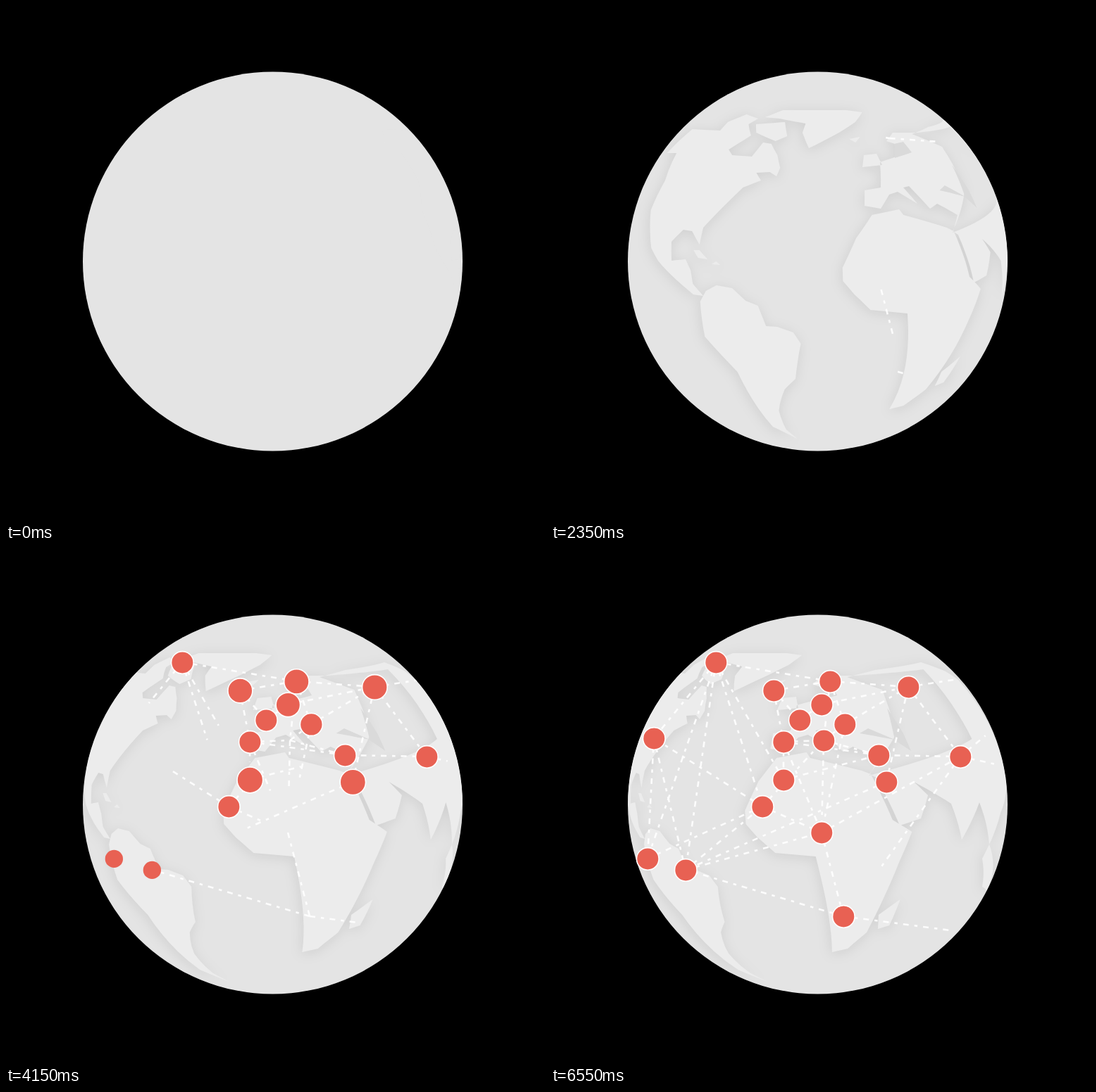
Write an HTML page that moves like this. It is 765 px wide and 732 px high and loops after 6600 ms.

```html
<!DOCTYPE html>
<html lang="en">
<head>
<meta charset="utf-8">
<title>Globe network</title>
<style>
  html, body { margin: 0; width: 100%; height: 100%; overflow: hidden; background: #000; }
  svg { display: block; width: 100vw; height: 100vh; }
</style>
</head>
<body>
<svg viewBox="0 0 765 732">
  <defs>
    <clipPath id="disc"><circle cx="378.5" cy="363" r="269.5"/></clipPath>
    <filter id="soft" filterUnits="userSpaceOnUse" x="90" y="80" width="580" height="570" color-interpolation-filters="sRGB">
      <feDropShadow dx="-1" dy="3" stdDeviation="9" flood-color="#000" flood-opacity=".085"/>
    </filter>
  </defs>
  <circle cx="378.5" cy="363" r="269.5" fill="#e4e4e4"/>
  <g clip-path="url(#disc)">
    <g id="world">
      <path id="land" fill="#ececec" filter="url(#soft)"/>
      <path id="seas" fill="#dadada"/>
    </g>
    <g id="routes" stroke="#fff" stroke-opacity=".9" stroke-width="2.6" stroke-dasharray="8 8 4.5 8"/>
  </g>
  <g id="pins" fill="#e86153" stroke="#fff"/>
</svg>
<script>
const LOOP = 6600, STEP = 50, CX = 378.5, CY = 363, R = 269.5;
const byId = id => document.getElementById(id);
const clamp = (v, lo = 0, hi = 1) => Math.min(hi, Math.max(lo, v));
const ringRadius = y => Math.sqrt(Math.max(1, R * R - (y - CY) ** 2));

// Decelerating spin in radians; zero at the end of the loop.
function spin(s) {
  const push = 45 * Math.max(0, 1 - s / 1.5) ** 2;
  return (0.0594 * ((8 - s) ** 3.6 - 3.81) + push) * Math.PI / 180;
}
// Pins and routes slide sideways as one flat layer.
const slide = s => 0.0495 * ((8 - s) ** 4.3 - 4.94);

// An outline as seen at a given second, converted to longitude and height.
function outline(second, text) {
  const turn = spin(second);
  const points = text.trim().split(/\s+/).map(pair => {
    const [x, y] = pair.split(',').map(Number);
    return [Math.asin(clamp((x - CX) / ringRadius(y), -1, 1)) - turn, y];
  });
  return points.flatMap(([lon, y], i) => {
    const [lon2, y2] = points[(i + 1) % points.length];
    const cuts = Math.ceil(Math.hypot((lon2 - lon) * R, y2 - y) / 14) || 1;
    return Array.from({ length: cuts }, (_, k) =>
      [lon + (lon2 - lon) * k / cuts, y + (y2 - y) * k / cuts]);
  });
}

const northAmerica = outline(1.5, `197,209 237,175 295,177 303,165 330,154 352,160 340,168
  350,184 320,204 328,212 360,214 372,194 385,196 398,212 406,230 403,242 392,236 372,237
  381,248 355,258 297,315 292,339 278,320 262,318 241,335 242,362 268,360 277,376 280,395
  297,412 280,410 215,362 200,344 192,290 213,248 222,209`);
const baffin = outline(1.5, '352,168 395,165 405,185 390,192 357,180');
const greenland = outline(1.5, `362,158 385,148 470,148 490,151 488,165 440,202 425,180
  425,167 385,160`);
const iceland = outline(1.5, '489,189 501,186 498,194');
const cuba = outline(1.5, '282,347 292,347 306,360 290,358');
const hispaniola = outline(1.5, '313,367 320,363 327,368');
const southAmerica = outline(1.5, `291,420 302,405 320,397 345,401 365,419 383,426 392,455
  408,456 430,464 438,480 420,530 400,545 380,575 376,602 382,615 358,598 335,520 292,470`);
const africa = outline(3.45, `338,391 337,372 357,330 382,297 424,289 430,297 500,315 512,320
  540,385 563,402 545,445 490,545 460,568 438,573 437,437 380,432 355,410`);
const madagascar = outline(3.45, '505,540 510,520 540,498 520,535');
const britain = outline(2.35, '444,212 462,210 470,226 442,229');
const europe = outline(2.35, `445,262 445,284 468,288 480,268 492,264 520,281 500,258 508,256
  538,288 548,281 577,297 570,322 640,270 566,171 520,180 485,180 476,192 488,196 490,214
  467,222 468,258`);
const asia = outline(6.55, `452,320 490,262 470,200 420,182 460,172 525,161 560,174 578,186
  646,325 638,375 622,420 608,360 583,413 568,362 515,331 535,350 525,383 495,393 462,325`);
const sumatra = outline(6.55, '612,440 622,420 622,488 612,480');
const lands = [northAmerica, baffin, greenland, iceland, cuba, hispaniola, southAmerica,
  africa, madagascar, britain, europe, asia, sumatra];

const baltic = outline(2.35, '487,196 500,193 512,208 488,216');
const blackSea = outline(6.55, '438,262 450,255 488,271');
const caspian = outline(6.55, '477,226 500,262 511,287 488,272');
const seas = [baltic, blackSea, caspian];

function project(shapes, turn) {
  return shapes.map(shape => 'M' + shape.map(([lon, y]) => {
    const angle = clamp(lon + turn, -Math.PI / 2, Math.PI / 2);
    return (CX + ringRadius(y) * Math.sin(angle)).toFixed(1) + ' ' + y.toFixed(1);
  }).join('L') + 'Z').join('');
}

// Resting place and the second the pin pops up; places without a second have no pin.
const places = {
  baffin: [234, 161, 2.8], iceland: [316, 201, 3.5], norway: [396, 188, 3.55],
  holland: [384, 221, 3.42], france: [353, 243, 2.6], balkans: [417, 249, 3.05],
  spain: [330, 274, 2.6], italy: [387, 272, 4.45], turkey: [465, 293, 2.4],
  egypt: [476, 331, 3.7], urals: [507, 196, 3.6], india: [581, 295, 2.8],
  morocco: [330, 328, 3.75], dakar: [300, 366, 2.8], congo: [384, 403, 4.82],
  carolina: [146, 269, 4.2], panama: [137, 440, 3.95], guyana: [191, 456, 3.95],
  cape: [415, 522, 4.65],
  siberia: [577, 185], china: [636, 307], tibet: [618, 264], kenya: [462, 461], ocean: [574, 543]
};

// Routes grouped by first second and seconds to draw.
const waves = [
  [2, 0.6, 'norway-urals congo-cape'],
  [2.3, 1.5, 'cape-guyana norway-baffin'],
  [2.5, 1.1, `urals-india india-turkey spain-turkey egypt-urals balkans-urals iceland-spain
    iceland-france urals-siberia norway-italy norway-balkans france-holland`],
  [3.2, 0.9, 'spain-italy iceland-norway holland-urals italy-turkey italy-balkans'],
  [3.45, 1.3, `baffin-morocco baffin-dakar baffin-carolina dakar-carolina dakar-congo
    egypt-guyana spain-morocco spain-congo italy-congo balkans-congo morocco-turkey
    dakar-italy india-china`],
  [4.9, 0.9, `congo-india carolina-panama baffin-panama carolina-guyana baffin-guyana`],
  [5.3, 1.3, 'panama-dakar guyana-dakar guyana-congo india-tibet india-kenya'],
  [2.4, 4.2, 'cape-ocean']
];

function make(tag, parent) {
  return byId(parent).appendChild(document.createElementNS('http://www.w3.org/2000/svg', tag));
}
function set(node, attrs) {
  for (const name in attrs) node.setAttribute(name, attrs[name]);
}
const routes = waves.flatMap(([start, span, names]) => names.split(/\s+/).map(name => {
  const [from, to] = name.split('-').map(key => places[key]);
  return { from, to, start, span, node: make('line', 'routes') };
}));
const pins = Object.values(places).filter(place => place.length === 3)
  .map(([x, y, start]) => ({ x, y, start, node: make('circle', 'pins') }));

// Grows from a dot, overshoots, then settles.
function popRadius(age) {
  if (age < 0.35) return 1 + 17.5 * Math.min(1, age / 0.3);
  return 15.8 + 2.7 * clamp((1.15 - age) / 0.8);
}

function draw(s) {
  const turn = spin(s), shift = slide(s);
  byId('world').setAttribute('opacity', clamp(0.05 + s / 0.4));
  byId('land').setAttribute('d', project(lands, turn));
  byId('seas').setAttribute('d', project(seas, turn));
  for (const { from: [x, y], to, start, span, node } of routes) {
    const p = clamp((s - start) / span);
    set(node, {
      x1: x + shift, y1: y,
      x2: x + (to[0] - x) * p + shift, y2: y + (to[1] - y) * p,
      visibility: p > 0 ? 'visible' : 'hidden'
    });
  }
  for (const { x, y, start, node } of pins) {
    const age = s - start;
    set(node, {
      cx: x + shift + 0.3, cy: y + 0.4, r: age < 0 ? 0 : popRadius(age),
      'stroke-width': age > 0.22 ? 1.6 : 0,
      opacity: clamp(0.4 + age * 5),
      visibility: age < 0 ? 'hidden' : 'visible'
    });
  }
}

const began = performance.now();
function tick() {
  const elapsed = (performance.now() - began) % LOOP;
  draw(Math.floor(elapsed / STEP) * STEP / 1000);
  requestAnimationFrame(tick);
}
tick();
</script>
</body>
</html>
```
